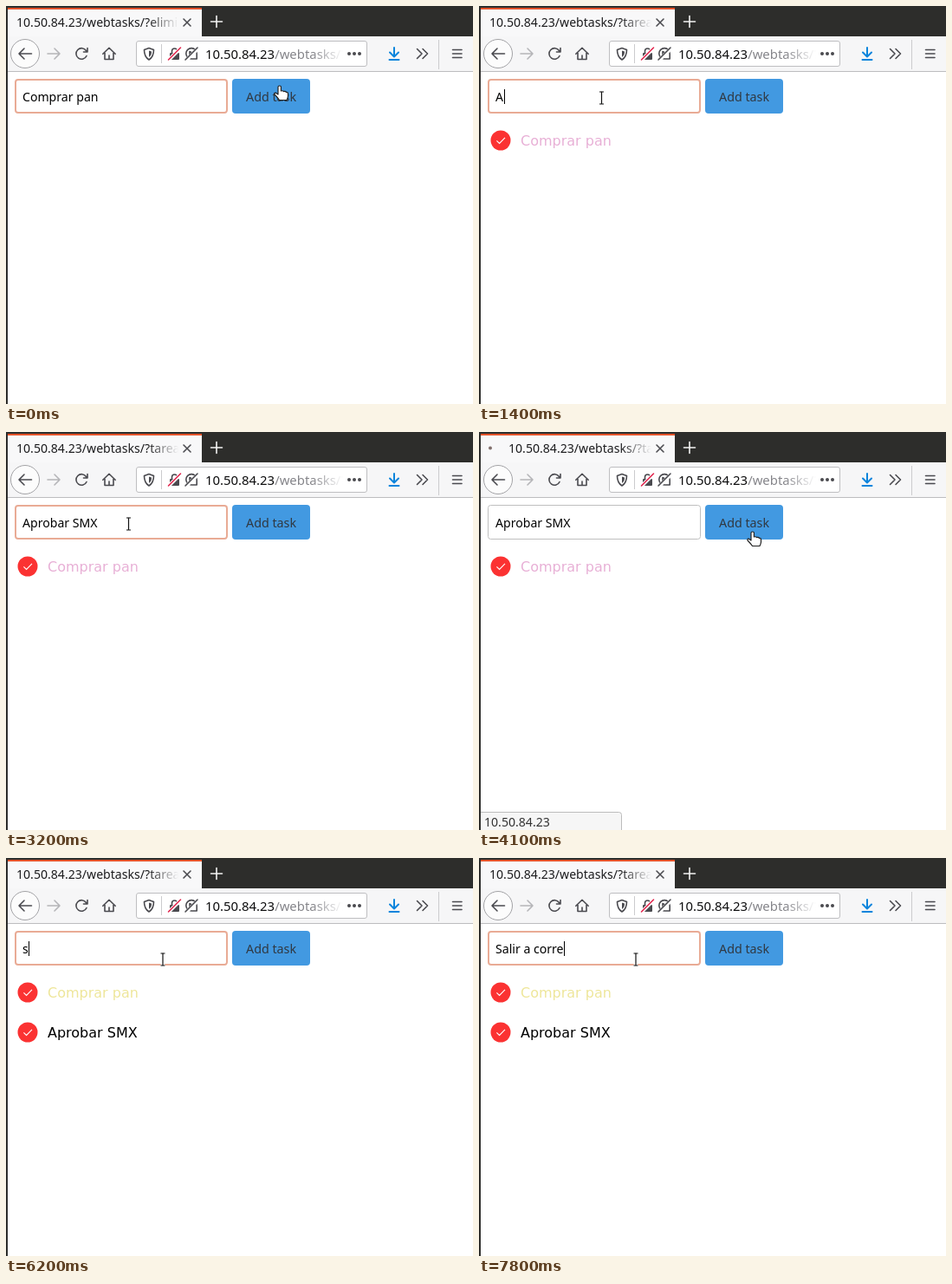
These frames come from a looping animation (539x459 px, 8 s). An HTML page:

```html
<!DOCTYPE html>
<html lang="es">
<head>
<meta charset="utf-8">
<title>Web tasks</title>
<style>
  html, body { margin: 0; width: 100%; height: 100%; overflow: hidden; background: #fff; }
  svg { display: block; width: 100vw; height: 100vh; }
  text { font: 14.1px "Noto Sans", "Open Sans", sans-serif; white-space: pre; }
  .url { font-size: 14.9px; }
  .task { font: 16px "DejaVu Sans", sans-serif; }
  .line { fill: none; stroke: #4a4a4f; stroke-width: 1.6; stroke-linecap: round; stroke-linejoin: round; }
</style>
</head>
<body>
<svg viewBox="0 0 539 459" preserveAspectRatio="none">
  <defs>
    <linearGradient id="titleFade" gradientUnits="userSpaceOnUse" x1="164" x2="199">
      <stop stop-color="#fff"/><stop offset="1" stop-color="#000"/>
    </linearGradient>
    <linearGradient id="urlFade" gradientUnits="userSpaceOnUse" x1="354" x2="389">
      <stop stop-color="#fff"/><stop offset="1" stop-color="#000"/>
    </linearGradient>
    <mask id="titleMask" maskUnits="userSpaceOnUse" x="0" y="0" width="226" height="35">
      <path fill="url(#titleFade)" d="M0 0H226V35H0z"/>
    </mask>
    <mask id="urlMask" maskUnits="userSpaceOnUse" x="220" y="36" width="180" height="38">
      <path fill="url(#urlFade)" d="M220 36H400V74H220z"/>
    </mask>
    <clipPath id="tabClip"><path d="M2 4H226V35H2z"/></clipPath>
    <filter id="shadow" x="-10%" y="-10%" width="120%" height="130%">
      <feDropShadow dx="0" dy="2" stdDeviation="2.5" flood-opacity=".3"/>
    </filter>
    <g id="check">
      <circle r="11.5" fill="#fb3232"/>
      <path d="M-4.6 .3L-1.4 3.5L5-3.2" fill="none" stroke="#fff" stroke-width="1.1"/>
    </g>
  </defs>

  <!-- tab strip -->
  <path fill="#2d2d2b" d="M0 0H539V35H0z"/>
  <path fill="#f8f8f9" d="M2 4H226V35H2z"/>
  <path fill="#e4532a" d="M2 2H226V4H2z"/>
  <circle id="burst" cx="20" cy="19" fill="#0a94e8" clip-path="url(#tabClip)"/>
  <circle id="spinner" cy="18.5" r="2" fill="#81706c"/>
  <g mask="url(#titleMask)"><text id="title" y="24" fill="#1c1c1e"></text></g>
  <path class="line" d="M205 15l8 8M213 15l-8 8"/>
  <path class="line" style="stroke:#f4f4f4" d="M236.5 18h13M243 11.5v13"/>

  <!-- toolbar -->
  <path fill="#f6f6f7" d="M0 35H539V75H0z"/>
  <path fill="#bdbdbf" d="M0 75H539V76H0z"/>
  <circle cx="22" cy="55" r="16.5" fill="#fcfcfc" stroke="#a3a3a6"/>
  <path class="line" d="M29.5 55H15M21 49L15 55L21 61"/>
  <path class="line" style="stroke:#b5b5b8" d="M48 55H62M56 49L62 55L56 61"/>
  <path class="line" d="M92.5 51.5A6.3 6.3 0 1 0 93 57.5M94 48.5V53H89.5"/>
  <path class="line" d="M111.8 55.3L119 48.3L126.2 55.3M114 54V61.5H124V54M119 61V57"/>
  <rect x="150.5" y="40.5" width="266" height="29" rx="2.5" fill="#fff" stroke="#bebec1"/>
  <path class="line" d="M165 48.5L170.5 50.5C170.5 56 169 59.5 165 62C161 59.5 159.5 56 159.5 50.5z"/>
  <path fill="#4a4a4f" d="M165 51.5L168 52.5C168 56 167 57.5 165 59z"/>
  <path stroke="#cbcbce" d="M179.5 44V66M499.5 39V73"/>
  <rect x="189" y="54" width="11" height="8" rx="1" fill="#4a4a4f"/>
  <path class="line" d="M191.5 54V52A3 3 0 0 1 197.5 52V54"/>
  <path class="line" style="stroke:#fff;stroke-width:4" d="M188 62L202 48"/>
  <path class="line" style="stroke:#e22850" d="M187.5 62L201.5 48"/>
  <path class="line" d="M214 61A6.2 6.2 0 1 1 220.2 55V61H214M212 52.5V57.5L216.5 55z"/>
  <path class="line" style="stroke:#fff;stroke-width:4" d="M208 62.5L222 48.5"/>
  <path class="line" d="M207 62L221 48"/>
  <g mask="url(#urlMask)">
    <text class="url" x="230" y="60.5" fill="#0c0c0d">10.50.84.23<tspan fill="#85858a">/webtasks/?</tspan></text>
  </g>
  <g fill="#4a4a4f"><circle cx="396" cy="55" r="2"/><circle cx="402" cy="55" r="2"/><circle cx="408" cy="55" r="2"/></g>
  <path class="line" style="stroke:#0a84dc;stroke-width:2" d="M448 48V58M443 53.5L448 58.5L453 53.5M442.5 62H453.5"/>
  <path class="line" d="M474.5 49.5L480 55L474.5 60.5M481 49.5L486.5 55L481 60.5"/>
  <path class="line" d="M515.5 50.5H526M515.5 55H526M515.5 59.5H526"/>

  <!-- page -->
  <path fill="#fff" d="M0 76H539V459H0z"/>
  <rect id="field" fill="#fff"/>
  <text id="value" x="19" y="110"></text>
  <path id="caret" stroke="#000"/>
  <rect x="261" y="84" width="90" height="40" rx="4" fill="#4299e1"/>
  <text x="277" y="110" fill="#303841" style="font-size:14.3px">Add task</text>
  <g id="firstTask"><use href="#check" x="25" y="155"/><text id="firstText" class="task" x="48" y="161">Comprar pan</text></g>
  <g id="secondTask"><use href="#check" x="25" y="201"/><text class="task" x="48" y="207">Aprobar SMX</text></g>
  <g id="popup">
    <rect id="popupBox" x="10.5" y="124.5" width="245" fill="#fff" stroke="#c4c4c4" filter="url(#shadow)"/>
    <g id="popupRows"></g>
  </g>
  <g id="status">
    <path fill="#f6f6f6" stroke="#bcbcbc" d="M0 438.5H161.5Q164.5 438.5 164.5 441.5V460H0z"/>
    <text x="6" y="455" fill="#333">10.50.84.23</text>
  </g>
  <path fill="#2d2d2b" d="M0 0H2V459H0z"/>

  <!-- pointers, drawn around their hot spots -->
  <g id="beam" fill="none">
    <path stroke="#fff" stroke-width="3" d="M-2.5-7H2.5M-2.5 7H2.5M0-7V7"/>
    <path stroke="#111" stroke-width="1.2" d="M-2.5-7H-.5L0-6.5L.5-7H2.5M-2.5 7H-.5L0 6.5L.5 7H2.5M0-6.5V6.5"/>
  </g>
  <path id="hand" fill="#fff" stroke="#222" stroke-width="1.2" stroke-linejoin="round"
    d="M-2 1.5Q-2 0-.3 0T1.4 1.5V6Q3.5 5.3 4.6 6.6Q6.6 6 7.4 7.4Q9.5 7.2 9.5 9V12Q9.3 14 8 16.5H-.5Q-2 14-6 10Q-6.6 7.8-4.5 8.2L-2 10z"/>
</svg>
<script>
const LOOP = 8000, TICK = 100, BURST = 375;
const HOST = "10.50.84.23";
const $ = id => document.getElementById(id);
const set = (id, attrs) => {
  for (const name in attrs) $(id).setAttribute(name, attrs[name]);
};
const show = (id, on) => { $(id).style.display = on ? "" : "none"; };
const within = (t, a, b) => t >= a && t < b;

// Latest entry of a [time, ...values] track that has begun.
const latest = (track, t) => track.findLast(entry => entry[0] <= t);

const typed = [
  [0, "Comprar pan"], [400, ""], [1400, "A"], [1600, "Ap"], [1700, "Apr"], [1800, "Apro"],
  [2000, "Aprob"], [2100, "Aproba"], [2300, "Aprobar"], [2600, "Aprobar "],
  [2800, "Aprobar S"], [2900, "Aprobar SM"], [3100, "Aprobar SMX"], [4200, ""],
  [6200, "s"], [6500, ""], [6600, "S"], [6700, "Sal"], [6800, "Salir"], [7100, "Salir "],
  [7300, "Salir a"], [7400, "Salir a c"], [7600, "Salir a co"], [7700, "Salir a corr"], [7800, "Salir a corre"]
];
const pointer = [
  [0, "hand", 316, 92], [200, "hand", 322, 97], [300, "hand", 290, 102], [400, "beam", 230, 106],
  [500, "beam", 181.5, 108], [600, "beam", 155, 107], [700, "beam", 141.5, 106],
  [3600, "beam", 235, 114], [3700, "hand", 316, 115],
  [4600, "hand", 300, 114], [4700, "beam", 245, 119], [4800, "beam", 210, 118], [5200, "beam", 181, 117]
];
const popupRows = [[0, 0], [1600, 2], [1800, 0], [6300, 2], [6500, 5], [6800, 0]];
const suggestions = ["Aprobar SMX", "Salir a correr", "Comprar pan", "Comprar leche", "Llamar a casa"];

function drawTab(t, loading) {
  const loadedAt = t < 4200 ? 400 : 4200;
  const p = (t - loadedAt) / BURST;
  const active = p > 0 && p < 1;
  show("burst", active);
  if (active) set("burst", { r: 333 * p * (2 - p), opacity: 0.27 * (1 - p) ** 2 });

  show("spinner", loading);
  const loadStart = t < 4100 ? 100 : 4100;
  set("spinner", { cx: 20 - 7 * Math.cos((t - loadStart) / 800 * 2 * Math.PI) });
  set("title", { x: loading ? 34 : 12 });
  $("title").textContent = HOST + "/webtasks/?" + (t < 400 ? "elimina" : "tarea=");
}

function drawField(t) {
  const focused = t < 100 || within(t, 1000, 4100) || t >= 5400;
  const inset = focused ? 1 : 0.5;
  set("field", {
    x: 10 + inset, y: 84 + inset, width: 246 - 2 * inset, height: 40 - 2 * inset, rx: 3,
    stroke: focused ? "#e9ab95" : "#bfbfbf", "stroke-width": 2 * inset
  });

  const text = latest(typed, t)[1];
  $("value").textContent = text || "Task description...";
  set("value", { fill: text ? "#000" : "#757575" });
  const end = 19.5 + (text ? $("value").getComputedTextLength() : 0);
  set("caret", { d: `M${Math.round(end) + 0.5} 96V113` });
  show("caret", focused && (within(t, 1000, 3200) || t >= 5400));
}

function drawPopup(t) {
  const count = latest(popupRows, t)[1];
  show("popup", count);
  set("popupBox", { height: count * 20 + 1 });
  [...$("popupRows").children].forEach((row, i) => { row.style.display = i < count ? "" : "none"; });
}

function drawPointer(t) {
  const [, kind, x, y] = latest(pointer, t);
  for (const id of ["hand", "beam"]) show(id, id === kind);
  set(kind, { transform: `translate(${x} ${y})` });
}

function draw(time) {
  const t = Math.floor(time % LOOP / TICK) * TICK;
  const loading = within(t, 100, 400) || within(t, 4100, 4200);
  drawTab(t, loading);
  drawField(t);
  drawPopup(t);
  drawPointer(t);
  show("status", loading);
  show("firstTask", t >= 400);
  show("secondTask", t >= 4200);
  set("firstText", { fill: t < 4200 ? "#e8b0d6" : "#eee69a" });
}

suggestions.forEach((label, i) => {
  const row = document.createElementNS("http://www.w3.org/2000/svg", "text");
  row.textContent = label;
  row.setAttribute("x", 19);
  row.setAttribute("y", 140 + i * 20);
  $("popupRows").append(row);
});
const start = performance.now();
function frame() {
  draw(performance.now() - start);
  requestAnimationFrame(frame);
}
frame();
</script>
</body>
</html>
```
